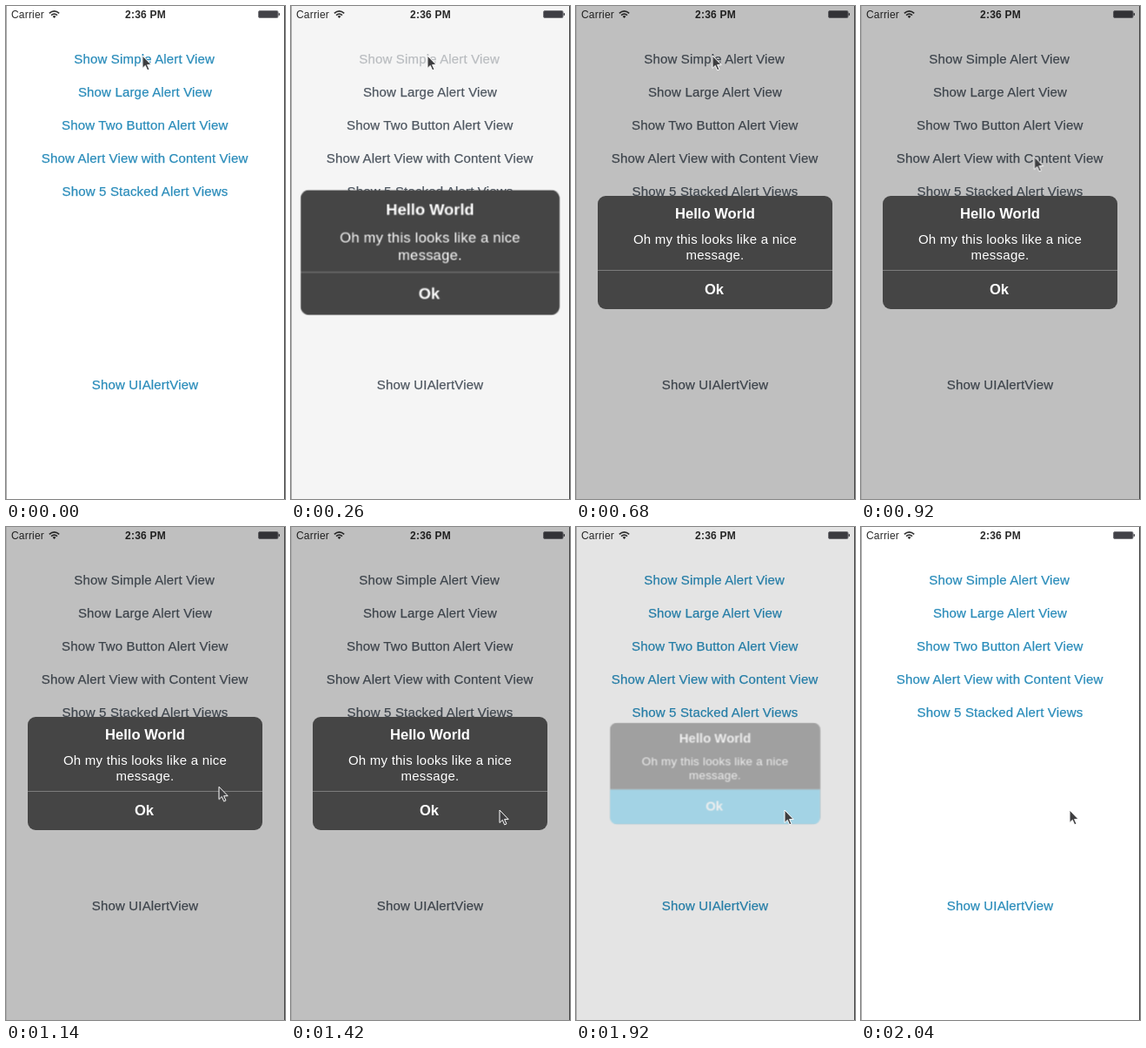
Write an HTML page that moves like this. It is 321 px wide and 566 px high and loops after 2200 ms.

```html
<!DOCTYPE html>
<html lang="en">
<head>
<meta charset="utf-8">
<title>Alert view</title>
<style>
  html, body { margin: 0; width: 100%; height: 100%; overflow: hidden; background: #fff; }
  svg { display: block; width: 321px; height: 566px; }
  text { font-family: "Liberation Sans", Arial, sans-serif; text-anchor: middle; }

  .status { font-size: 12px; letter-spacing: .2px; fill: #2a2a2a; }
  .bold { font-weight: bold; }
  .links { font-size: 15px; letter-spacing: .17px; stroke-width: .25px; }
  .title { font-size: 16.6px; font-weight: bold; }
  .message { font-size: 15px; letter-spacing: .23px; }

  .links, .pressed, .dim, .alert, .ok, .cursor { animation: 2200ms infinite both; }
  .links { animation-name: tint; animation-timing-function: step-end; }
  .pressed { animation-name: press; }
  .dim { animation-name: dim; }
  .alert { animation-name: pop, fade; transform-origin: 160px 283px; }
  .ok { animation-name: ok; animation-timing-function: step-end; }
  .cursor { animation-name: move; }

  /* Links turn grey while the alert is up */
  @keyframes tint {
    0% { fill: #2a8cba; stroke: #2a8cba; }
    8.182% { fill: #525b65; stroke: #525b65; }
    80.909%, 100% { fill: #2a8cba; stroke: #2a8cba; }
  }
  @keyframes press {
    0% { opacity: 1; animation-timing-function: step-end; }
    2.727%, 11.364% { opacity: .33; }
    20.909%, 100% { opacity: 1; }
  }
  @keyframes dim {
    0% { opacity: 0; }
    8.182% { opacity: 0; animation-timing-function: ease-in-out; }
    21.818% { opacity: .25; }
    80.909% { opacity: .25; animation-timing-function: ease-in-out; }
    92.727%, 100% { opacity: 0; }
  }
  @keyframes pop {
    0% { transform: scale(1.26); }
    8.182% { transform: scale(1.26); animation-timing-function: cubic-bezier(.15, .5, .2, 1); }
    26.364% { transform: scale(1); }
    80.909% { transform: scale(1); animation-timing-function: ease-in-out; }
    92.727%, 100% { transform: scale(.82); }
  }
  @keyframes fade {
    0%, 8.182% { opacity: 0; }
    11.364% { opacity: 1; }
    80.909% { opacity: 1; animation-timing-function: ease-in-out; }
    92.727%, 100% { opacity: 0; }
  }
  @keyframes ok {
    0% { opacity: 0; }
    76.364%, 100% { opacity: 1; }
  }
  @keyframes move {
    0% { transform: translate(157px, 57px); }
    33.636% { transform: translate(157px, 57px); animation-timing-function: cubic-bezier(.4, 0, .5, 1); }
    51.818% { transform: translate(245px, 298px); animation-timing-function: ease-out; }
    64.545%, 100% { transform: translate(240px, 325px); }
  }
</style>
</head>
<body>
<svg viewBox="0 0 321 566">
  <defs>
    <clipPath id="panel"><rect x="25" y="218" width="270" height="130" rx="9"/></clipPath>
  </defs>
  <rect width="321" height="566" fill="#fff"/>

  <g class="status">
    <text x="25" y="14">Carrier</text>
    <text class="bold" x="160.5" y="14">2:36 PM</text>
  </g>
  <g fill="none" stroke="#333" stroke-width="1.6">
    <path d="M49.8 8.4Q55.5 3.2 61.2 8.4M52 10.7Q55.5 7.5 59 10.7"/>
    <path d="M53.6 11.9Q55.5 10.3 57.4 11.9L55.5 14Z" fill="#333" stroke="none"/>
  </g>
  <g fill="#424248">
    <rect x="290.5" y="5.5" width="22.5" height="8" rx="1.5" stroke="#77777c"/>
    <rect x="313.5" y="8" width="1.5" height="3" rx=".7"/>
  </g>

  <g class="links">
    <text class="pressed" x="159.2" y="66">Show Simple Alert View</text>
    <text x="160" y="104">Show Large Alert View</text>
    <text x="159.7" y="142">Show Two Button Alert View</text>
    <text x="159.7" y="180">Show Alert View with Content View</text>
    <text x="160" y="218">Show 5 Stacked Alert Views</text>
    <text x="160" y="440">Show UIAlertView</text>
  </g>

  <rect class="dim" width="321" height="566" fill="#000"/>
  <rect width="1" height="566" fill="#aaa"/>
  <rect x="320" width="1" height="566" fill="#444"/>

  <g class="alert">
    <g clip-path="url(#panel)">
      <rect x="25" y="218" width="270" height="130" fill="#454545"/>
      <rect x="25" y="303" width="270" height="1" fill="#7c7c7c"/>
      <rect class="ok" x="25" y="303.5" width="270" height="44.5" fill="#4cbee7"/>
    </g>
    <g fill="#fff">
      <text class="title" x="160" y="244">Hello World</text>
      <text class="message" x="160" y="272.5">Oh my this looks like a nice</text>
      <text class="message" x="160" y="290.5">message.</text>
      <text class="title" x="159" y="331">Ok</text>
    </g>
  </g>

  <path class="cursor" d="M0 0V14.5L3.3 11.4L5.7 16.8L8 15.8L5.6 10.6H10.2Z"
        fill="#3e3e40" stroke="#fff" stroke-width="1"/>
</svg>
</body>
</html>
```
